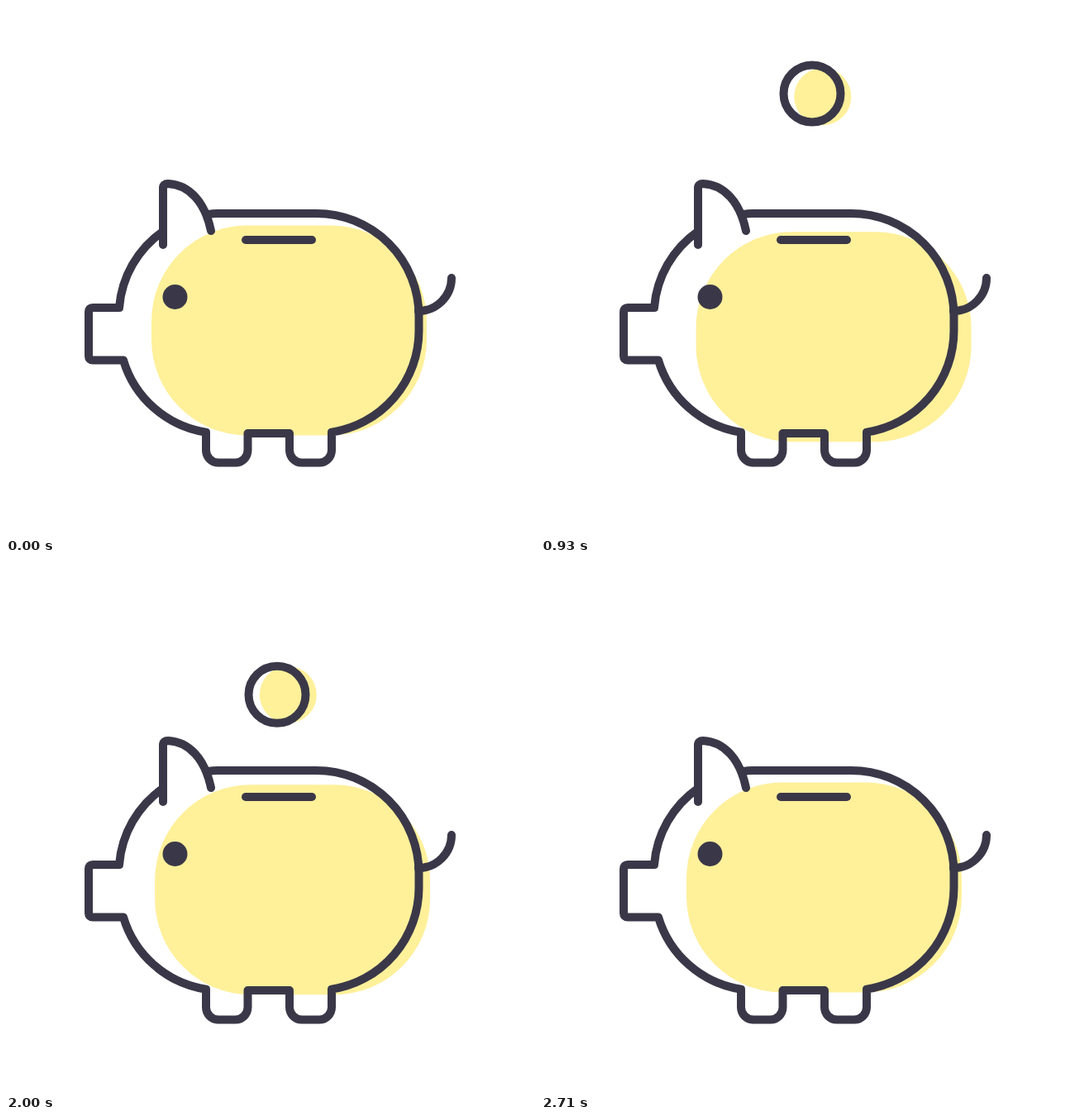
Write an HTML page that moves like this. It is 640 by 640 pixels and loops after 3.57 s.

```html
<!DOCTYPE html>
<html lang="en">
<head>
<meta charset="utf-8">
<title>Piggy bank</title>
<style>
  html, body { margin: 0; height: 100%; overflow: hidden; background: #fff; }
  svg { display: block; width: 100%; height: 100%; }
  .line { fill: none; stroke: #3a3848; stroke-width: 10; stroke-linecap: round; stroke-linejoin: round; }
  .fill { fill: #fff09a; }
</style>
</head>
<body>
<svg viewBox="0 0 640 640">
  <clipPath id="aboveSlot"><rect id="opening" width="640" height="283"/></clipPath>
  <rect id="shade" class="fill" x="176" y="265.5" width="333" height="254" rx="116"/>
  <g clip-path="url(#aboveSlot)">
    <g id="coin">
      <circle id="coinShade" class="fill" r="34.5"/>
      <circle class="line" r="34.5"/>
    </g>
  </g>
  <g id="pig" class="line">
    <path d="M245 252Q251 251 257 251H375.5A124 124 0 0 1 499.5 375V393A124 124 0 0 1 394 515.6
      V537.5A15 15 0 0 1 379 552.5H358A15 15 0 0 1 343 537.5V517H292.5V537.5A15 15 0 0 1 277.5 552.5
      H257A15 15 0 0 1 242 537.5V515.7A124 124 0 0 1 142 428.5H105Q100 428.5 100 423.5V370
      Q100 365 105 365H137A124 124 0 0 1 190 272.6"/>
    <path id="ear" d="M190 289V220Q190 215 196 215C222 216 241 238 248 272"/>
    <path id="tail"/>
    <path d="M290 283H370"/>
    <circle cx="204.5" cy="352" r="15" fill="#3a3848" stroke="none"/>
  </g>
</svg>
<script>
const LOOP = 3570, STEP = 1000 / 14, BASE = 567;
const set = (id, name, value) => document.getElementById(id).setAttribute(name, value);

const smooth = u => {
  u = Math.min(1, Math.max(0, u));
  return u * u * (3 - 2 * u);
};
const pulse = (t, start, peak, end) => smooth((t - start) / (peak - start)) * smooth((end - t) / (end - peak));

const tailUp = [499, 369, 521, 369, 539, 351, 539, 329];
const tailDown = [499, 369, 517, 362, 538, 368, 541, 394];

function drawPig(t, stretch, tall) {
  set('pig', 'transform', `translate(0 ${BASE}) scale(1 ${tall}) translate(0 ${-BASE})`);
  set('ear', 'transform', `rotate(${9 * stretch} 220 284)`);
  const p = tailUp.map((y, i) => y + (tailDown[i] - y) * stretch);
  set('tail', 'd', `M${p.slice(0, 2)}C${p.slice(2)}`);

  const drift = Math.max(0, Math.sin(Math.PI * t / 2250));
  set('shade', 'transform', `translate(${12 * drift} ${8 * drift})
    translate(342.5 493) scale(${1 + .07 * stretch}) translate(-342.5 -493)`);
}

// The coin shoots up, hovers and drops; its spin follows the same two curves.
function drawCoin(t, tall) {
  const rise = Math.exp((428 - t) / 265), fall = Math.exp((t - 2000) / 170);
  const angle = (420 - 294 * rise + 301 * fall) * Math.PI / 180;
  set('coin', 'transform', `translate(328 ${90 + 105 * rise + 69 * fall})`);
  set('coinShade', 'cx', 13.3 * Math.cos(angle));
  set('coinShade', 'cy', 13.3 * Math.sin(angle));
  set('opening', 'height', BASE - (BASE - 283) * tall);
}

// The motion runs at 14 poses per second
function tick() {
  const t = Math.floor((performance.now() % LOOP + 5) / STEP) * STEP;
  const stretch = pulse(t, 0, 214, 428) + pulse(t, 2071, 2286, 2710);
  const tall = 1 + .069 * stretch;
  drawPig(t, stretch, tall);
  drawCoin(t, tall);
  requestAnimationFrame(tick);
}
tick();
</script>
</body>
</html>
```
